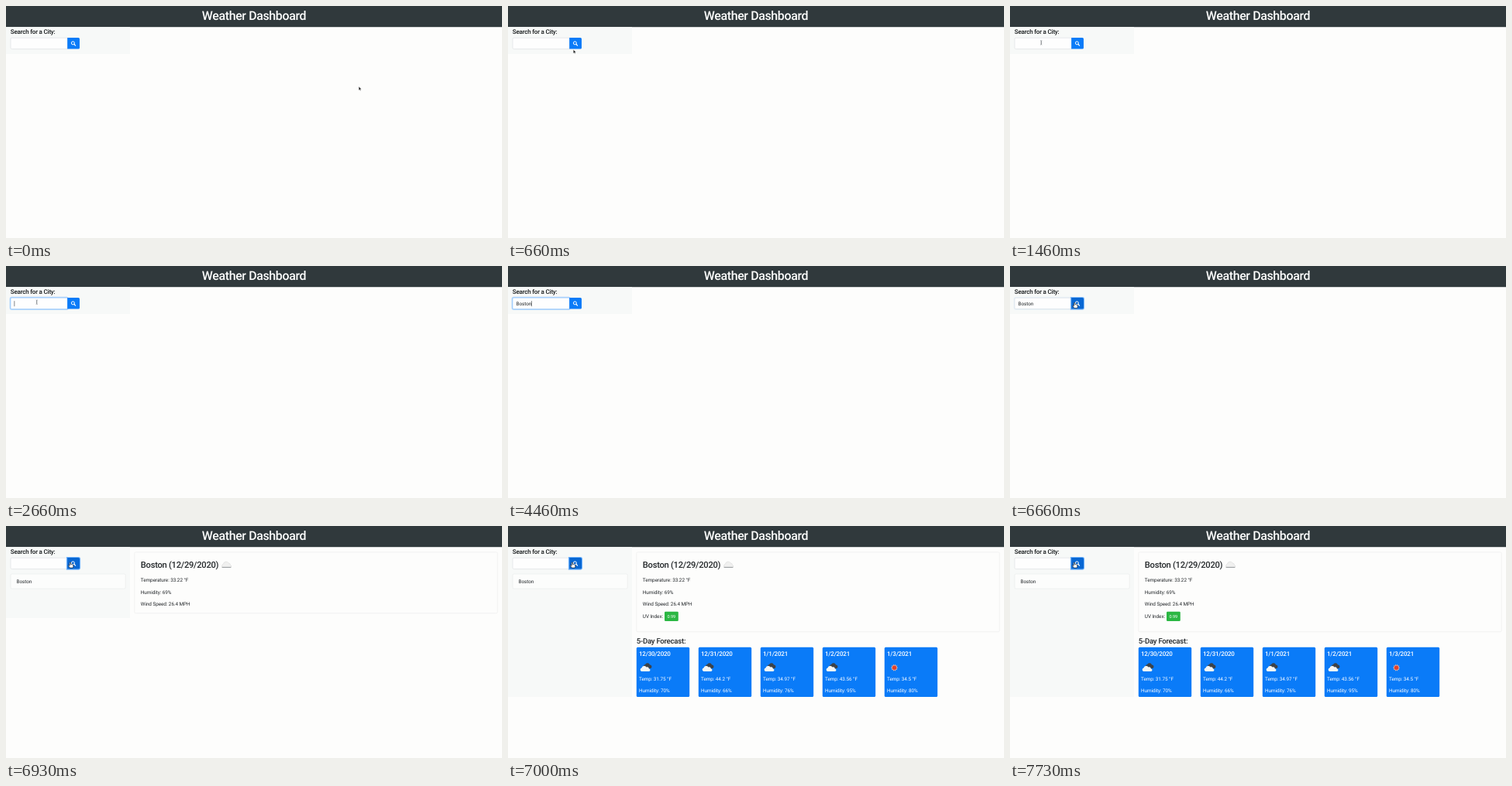
Recreate the animation shown at these times as an HTML page. Size 640 by 300 pixels, loop 8 s.

```html
<!DOCTYPE html>
<html lang="en">
<head>
<meta charset="utf-8">
<title>Weather Dashboard</title>
<style>
  html, body { margin: 0; width: 100%; height: 100%; overflow: hidden; background: #fdfdfc; }
  svg { display: block; width: 100vw; height: 100vh; }
  text { font: 400 6.4px Roboto, Inter, sans-serif; letter-spacing: -.01em; fill: #24282b; text-rendering: geometricPrecision; }
  .h { font-weight: 500; letter-spacing: -.025em; }
  .h1 { font-size: 16px; fill: #fdfefd; }
  .h3 { font-size: 11.2px; }
  .h4 { font-size: 9.6px; }
  .h5 { font-size: 8px; }
  .sm { font-size: 5.6px; }
  .inv { fill: #fff; }
</style>
</head>
<body>
<svg viewBox="0 0 640 300">
  <defs>
    <g id="overcast">
      <path d="M4 -1.2a2.6 2.6 0 0 1 2.2-2.9 3.2 3.2 0 0 1 6 .3 2.6 2.6 0 0 1 2.4 2.7q0 2-2.4 2H6z" fill="#3c4248"/>
      <path d="M1.5 4.6a2.2 2.2 0 0 1 .2-4.3 3.4 3.4 0 0 1 6-1.2 2.6 2.6 0 0 1 3.4 2 1.8 1.8 0 0 1 .3 3.5z" fill="#f4f5f4"/>
    </g>
    <g id="cloud">
      <path d="M2.2 4a2.2 2.2 0 0 1 .1-4.3 3.9 3.9 0 0 1 7-1.6 2.9 2.9 0 0 1 2.2 2.6 1.7 1.7 0 0 1-.2 3.3z" fill="#f0f0ef" stroke="#d2d3d3" stroke-width=".5"/>
      <path d="M1 3.7H12" stroke="#8d9092" stroke-width=".9" stroke-linecap="round"/>
    </g>
    <g id="sun">
      <path id="rays" fill="#f3b49b"/>
      <circle r="2.7" fill="#e2412b"/>
    </g>
  </defs>

  <rect width="640" height="27.2" fill="#30393c"/>
  <text class="h h1" x="320" y="18.1" text-anchor="middle">Weather Dashboard</text>

  <rect id="side" y="27.2" width="160" fill="#f7f9f8"/>
  <text class="h h5" x="5.8" y="36.4" style="fill:#16191b">Search for a City:</text>

  <rect id="ring" x="5.4" y="40.6" width="74.6" height="15.6" rx="1.9" fill="none" stroke="#007bff" stroke-opacity=".28" stroke-width="1.5"/>
  <path id="field" d="M79.4 41.2H7.6a1.6 1.6 0 0 0-1.6 1.6v11.2a1.6 1.6 0 0 0 1.6 1.6H79.4z" fill="#fefefe" stroke-width=".5"/>
  <text id="typed" x="10.6" y="50.8"></text>
  <rect id="caret" y="45.2" width=".6" height="7" fill="#33383c"/>

  <path id="halo" d="M79 41H93.4a1.6 1.6 0 0 1 1.6 1.6v11.4a1.6 1.6 0 0 1-1.6 1.6H79z" fill="none" stroke="#6fb2fb" stroke-width="2.2"/>
  <path id="button" d="M79.2 41H93.4a1.6 1.6 0 0 1 1.6 1.6v11.4a1.6 1.6 0 0 1-1.6 1.6H79.2z"/>
  <g fill="none" stroke="#fff">
    <circle cx="86.4" cy="47.9" r="2" stroke-width="1"/>
    <path d="M88 49.5l1.6 1.6" stroke-width="1.2" stroke-linecap="round"/>
  </g>

  <g id="history">
    <rect x="6" y="62" width="148.2" height="19" rx="1.6" fill="#fcfdfc" stroke="#e3e5e4" stroke-width=".5"/>
    <text x="13.5" y="73.7">Boston</text>
  </g>

  <g id="today">
    <rect id="card" x="165.8" y="33.8" width="468.4" rx="1.6" fill="#fdfdfc" stroke="#e6e7e6" stroke-width=".5"/>
    <text class="h h3" x="173.8" y="53.9">Boston (12/29/2020)</text>
    <use href="#cloud" x="278" y="49.7"/>
    <text x="173.8" y="72.3">Temperature: 33.22 °F</text>
    <text x="173.8" y="87.5">Humidity: 69%</text>
    <text x="173.8" y="102.8">Wind Speed: 26.4 MPH</text>
  </g>

  <g id="later">
    <text x="173.8" y="118.7">UV Index:</text>
    <rect x="202" y="110.8" width="17.8" height="12.2" rx="1.3" fill="#2bb743"/>
    <text class="sm inv" x="205.4" y="119">0.99</text>
    <text class="h h4" x="165.8" y="152">5-Day Forecast:</text>
    <g id="days"></g>
  </g>

  <g id="pointer">
    <path id="arrow" d="M0 0v4.6l1.1-1 .7 1.6.8-.3-.7-1.6h1.5z" fill="#111" stroke="#fff" stroke-width=".35"/>
    <path id="beam" d="M-1-2.8q1 0 1 .8v4q0 .8-1 .8M1-2.8q-1 0-1 .8v4q0 .8 1 .8" fill="none" stroke="#666b70" stroke-width=".55"/>
    <path id="hand" d="M-.7.2q.7-.9 1.4 0v2.3q.7-.5 1.2.1.7-.4 1.2.2.9-.2.9.8v1.5q0 1-.7 1.8H-.5Q-1.3 5.5-2.4 4.1q0-1 1-.5l.7.7z" fill="#fff" stroke="#111" stroke-width=".6" stroke-linejoin="round"/>
  </g>
</svg>
<script>
const LOOP = 8000, STEP = 1000 / 15;
const $ = id => document.getElementById(id);
const show = (id, on) => $(id).setAttribute('visibility', on ? 'visible' : 'hidden');
const ramp = (t, start, length) => Math.min(1, Math.max(0, (t - start) / length));
const mix = (a, b, k) => `rgb(${a.map((v, i) => Math.round(v + (b[i] - v) * k))})`;

const forecast = [
  ['12/30/2020', 'overcast', '31.75', 70],
  ['12/31/2020', 'overcast', '44.2', 66],
  ['1/1/2021', 'overcast', '34.97', 76],
  ['1/2/2021', 'overcast', '43.56', 95],
  ['1/3/2021', 'sun', '34.5', 80]
];
$('days').innerHTML = forecast.map(([date, icon, temp, humidity], i) => `
  <g transform="translate(${165.8 + 80 * i} 156.8)">
    <rect width="68.4" height="64.2" rx="1.6" fill="#0a7bf8"/>
    <text class="h h5 inv" x="3.2" y="11">${date}</text>
    <use href="#${icon}" x="${icon === 'sun' ? 12.8 : 5}" y="26.5"/>
    <text class="inv" x="3.2" y="43.3">Temp: ${temp} °F</text>
    <text class="inv" x="3.2" y="58.5">Humidity: ${humidity}%</text>
  </g>`).join('');

$('rays').setAttribute('d', 'M' + Array.from({ length: 20 }, (_, i) => {
  const r = i % 2 ? 3 : 4.7, a = i * Math.PI / 10;
  return `${r * Math.cos(a)} ${r * Math.sin(a)}`;
}).join('L') + 'z');

// time, x, y of the pointer tip
const path = [
  [0, 455.3, 104.3], [67, 448, 103], [200, 400, 97], [333, 329, 90], [467, 205, 68],
  [600, 100, 49], [733, 69, 64], [800, 80, 77], [867, 80, 77], [933, 78, 72],
  [1133, 61, 55], [1333, 44, 48], [1467, 40.3, 47.4], [1600, 39.7, 46.7],
  [5400, 39.7, 46.7], [5600, 52, 47.6], [5867, 74, 47.4], [6000, 74, 47.4],
  [6200, 81, 48.5], [6450, 84, 48], [6800, 82.8, 47.2]
];
function pointerAt(t) {
  const i = path.findIndex(p => p[0] > t);
  if (i < 0) return path[path.length - 1].slice(1);
  const [a, b] = [path[i - 1], path[i]], k = (t - a[0]) / (b[0] - a[0]);
  return [a[1] + (b[1] - a[1]) * k, a[2] + (b[2] - a[2]) * k];
}

const word = 'Boston', keys = [3200, 3466, 3600, 3800, 4266, 4466];
const FOCUS = 1650, CLICK = 6540, LISTED = 6860, LOADED = 6930, COMPLETE = 7000;

function draw(t) {
  const count = keys.filter(k => k <= t).length;
  const typed = $('typed');
  typed.textContent = t < LISTED ? word.slice(0, count) : '';

  const lastKey = count ? keys[count - 1] : FOCUS;
  const lit = Math.floor((t - lastKey + 80) / 520) % 2 === 0;
  show('caret', t >= FOCUS && t < CLICK && lit);
  $('caret').setAttribute('x', 10.6 + (count ? typed.getComputedTextLength() : 0));

  const focus = ramp(t, 1735, 220) - ramp(t, CLICK, 150);
  $('ring').setAttribute('opacity', focus);
  $('field').setAttribute('stroke', mix([210, 215, 218], [118, 182, 252], focus));

  const [x, y] = pointerAt(t);
  const inRow = y > 41 && y < 56;
  const kind = inRow && x > 79.3 && x < 95 ? 'hand' : inRow && x > 6 && x <= 79.3 ? 'beam' : 'arrow';
  const hidden = t >= keys[0] && t < 5460;
  for (const id of ['arrow', 'beam', 'hand']) show(id, id === kind && !hidden);
  $('pointer').setAttribute('transform', `translate(${x} ${y})`);

  $('button').setAttribute('fill', mix([10, 123, 248], [8, 103, 211], ramp(t, 6130, 150)));
  $('halo').setAttribute('opacity', ramp(t, CLICK, 150));

  show('history', t >= LISTED);
  show('today', t >= LOADED);
  show('later', t >= COMPLETE);
  $('card').setAttribute('height', t >= COMPLETE ? 103 : 79);
  const bottom = t >= COMPLETE ? 221 : t >= LOADED ? 119 : t >= LISTED ? 81 : 62;
  $('side').setAttribute('height', bottom - 27.2);
}

const start = performance.now();
function tick() {
  const t = (performance.now() - start) % LOOP;
  // the screen refreshes 15 times a second
  draw(Math.floor((t + 7) / STEP) * STEP + .5);
  requestAnimationFrame(tick);
}
tick();
</script>
</body>
</html>
```
